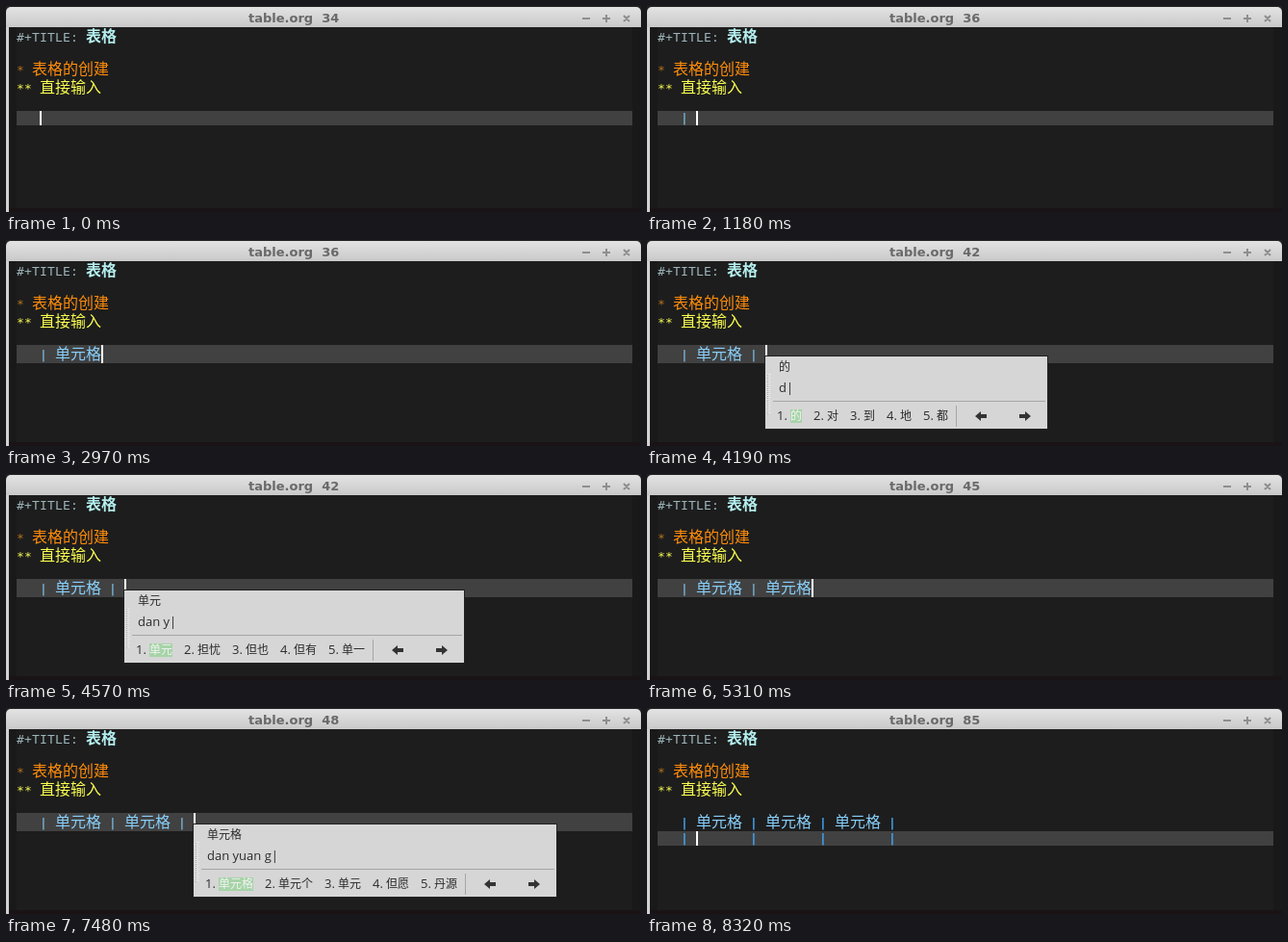
Recreate the animation shown at these times as an HTML page with a canvas. Size 660 by 214 pixels, loop 9.82 s.

```html
<!DOCTYPE html>
<html lang="zh">
<head>
<meta charset="utf-8">
<style>
html, body { margin: 0; width: 660px; height: 214px; overflow: hidden; background: #1d1d1d; }
canvas { display: block; }
</style>
</head>
<body>
<canvas id="stage" width="660" height="214"></canvas>
<script>
const ctx = document.getElementById('stage').getContext('2d');
const LOOP = 9820, LEFT = 11, CELL = 8, ROW_TOP = 109;
const MONO = '13px "DejaVu Sans Mono", monospace';
const CJK = '"Noto Sans CJK SC", "Noto Sans CJK", sans-serif';
const SKY = '#87cefa';

// Candidates offered by the input method for each typed string
const candidates = {
  'd': '的 对 到 地 都',
  'da': '大 打 达 答 搭',
  'dan': '但 单 蛋 担 淡',
  'dan y': '单元 担忧 但也 但有 单一',
  'dan yu': '但与 单于 丹玉 担 但',
  'dan yua': '单元 但愿 单元格 丹源 淡远',
  'dan yuan': '单元 但愿 单元格 丹源 淡远',
  'dan yuan g': '单元格 单元个 单元 但愿 丹源',
  'dan yuan ge': '单元格 单元 但愿 丹源 淡远'
};
const inputs = Object.keys(candidates);
const word = '单元格';

// Each state: start time, row text, buffer position, pending input
const states = [];
const at = (time, row, point, input) => states.push({ time, row, point, input });
const compose = (row, point, times) => times.forEach((t, i) => at(t, row, point, inputs[i]));

const first = '| ', second = first + word + ' | ', third = second + word + ' | ';
at(0, '', 34);
at(630, '|', 35);
at(1180, first, 36);
compose(first, 36, [1650, 1690, 1830, 2140, 2280, 2420, 2550, 2750, 2790]);
at(2970, first + word, 36);
at(3010, first + word, 39);
at(3380, first + word + ' ', 40);
at(3650, first + word + ' |', 41);
at(3860, second, 42);
compose(second, 42, [4190, 4250, 4360, 4570, 4730, 4890, 4950, 5090, 5150]);
at(5310, second + word, 45);
at(5780, second + word + ' ', 46);
at(6080, second + word + ' |', 47);
at(6280, third, 48);
compose(third, 48, [6640, 6710, 6790, 7030, 7130, 7240, 7340, 7480, 7540]);
at(7640, third + word, 48);
at(7680, third + word, 51);
at(8320, third + word + ' |', 85);
const last = states[states.length - 1];

const isWide = c => c > '\u2e80';

function rect(x, y, w, h, color) {
  ctx.fillStyle = color;
  ctx.fillRect(x, y, w, h);
}

function label(text, x, y, font, color) {
  ctx.font = font;
  ctx.fillStyle = color;
  ctx.fillText(text, x, y);
}

// Draws text on the character grid and returns the x after it
function gridText(text, x, y, color, weight = '') {
  for (const c of text) {
    label(c, x, y, weight + ' ' + (isWide(c) ? '16px ' + CJK : MONO), color);
    x += isWide(c) ? 2 * CELL : CELL;
  }
  return x;
}

function drawWindow(point) {
  rect(0, 0, 660, 214, '#1d1d1d');
  rect(3, 22, 8, 192, '#191919');
  rect(651, 22, 9, 192, '#191919');
  rect(3, 210, 657, 4, '#191316');
  rect(0, 0, 3, 214, '#d2d2d2');
  rect(0, 0, 660, 6, '#222');
  const shade = ctx.createLinearGradient(0, 0, 0, 22);
  shade.addColorStop(0, '#e4e4e4');
  shade.addColorStop(1, '#c9c9c9');
  ctx.fillStyle = shade;
  ctx.beginPath();
  ctx.roundRect(0, 1, 660, 21, [5, 5, 0, 0]);
  ctx.fill();
  label('table.org  ' + point, 252, 17, 'bold 13px "DejaVu Sans", sans-serif', '#696969');
  ctx.strokeStyle = '#8e8e8e';
  ctx.lineWidth = 2;
  ctx.beginPath();
  for (const [x1, y1, x2, y2] of [
    [599, 13, 607, 13], [620, 13, 628, 13], [624, 9, 624, 17],
    [642, 10, 648, 16], [648, 10, 642, 16]
  ]) {
    ctx.moveTo(x1, y1);
    ctx.lineTo(x2, y2);
  }
  ctx.stroke();
}

function drawHeadings() {
  gridText('表格', gridText('#+TITLE: ', LEFT, 37, '#9db4ba'), 37, '#b4eeee', 'bold');
  gridText('表格的创建', gridText('* ', LEFT, 71, '#b8761c'), 71, '#ff8c0a');
  gridText('直接输入', gridText('** ', LEFT, 90, '#fbff50'), 90, '#fbff50');
}

function drawTable(row, aligned) {
  const height = row.includes(word) ? 19 : 15;
  const x = LEFT + 3 * CELL;
  const top = aligned ? ROW_TOP + height : ROW_TOP;
  rect(LEFT, top, 640, aligned ? 15 : height, '#414141');
  let end = x;
  for (const c of row) {
    const bright = aligned && c === '|';
    end = gridText(c, end, ROW_TOP + height - (height > 15 ? 4 : 3),
      bright ? '#42a5f5' : SKY, bright ? 'bold' : '');
  }
  if (aligned) {
    gridText('|' + '        |'.repeat(3), x, top + 12, '#42a5f5', 'bold');
    end = x + 2 * CELL;
  }
  rect(end, top, 2, aligned ? 15 : height, '#fff');
  return end;
}

function drawArrow(x, direction) {
  ctx.fillStyle = '#333';
  ctx.beginPath();
  [[-6, 0], [0, -5], [0, -2], [6, -2], [6, 2], [0, 2], [0, 5]]
    .forEach(([dx, dy]) => ctx.lineTo(x + dx * direction, 183 + dy));
  ctx.fill();
}

function drawPopup(x, input) {
  const words = candidates[input].split(' ');
  const width = 233 + 12 * words.join('').length;
  const latin = '13px "Open Sans", "Noto Sans", sans-serif';
  const han = '12px ' + CJK;
  const ink = '#2b2b2b';
  rect(x - 1, 120, width + 2, 77, '#222');
  rect(x, 121, width, 75, '#d6d6d6');
  for (let y = 139; y < 181; y += 2) {
    for (let i = 0; i < 2; i++) rect(x + 1 + 2 * i + y % 4 / 2, y, 1, 1, '#f4f4f4');
    rect(x + 2, y + 1, 1, 1, '#aaa');
  }
  label(words[0], x + 14, 136, han, ink);
  label(input + '|', x + 14, 158, latin, ink);
  rect(x + 8, 167, width - 10, 1, '#a6a6a6');
  let cx = x + 12;
  words.forEach((w, i) => {
    const size = 12 * w.length;
    label(i + 1 + '.', cx, 187, latin, ink);
    if (!i) rect(cx + 14, 176, size, 14, '#a6d4a8');
    label(w, cx + 14, 187, han, i ? ink : '#f2f2f2');
    cx += size + 26;
  });
  rect(x + width - 95, 172, 1, 22, '#a6a6a6');
  drawArrow(x + width - 69, 1);
  drawArrow(x + width - 23, -1);
}

function frame(now) {
  const t = now % LOOP;
  const state = states.findLast(s => s.time <= t) || states[0];
  drawWindow(state.point);
  drawHeadings();
  const cursor = drawTable(state.row, state === last);
  if (state.input) drawPopup(cursor, state.input);
  requestAnimationFrame(frame);
}
frame(performance.now());
</script>
</body>
</html>
```
